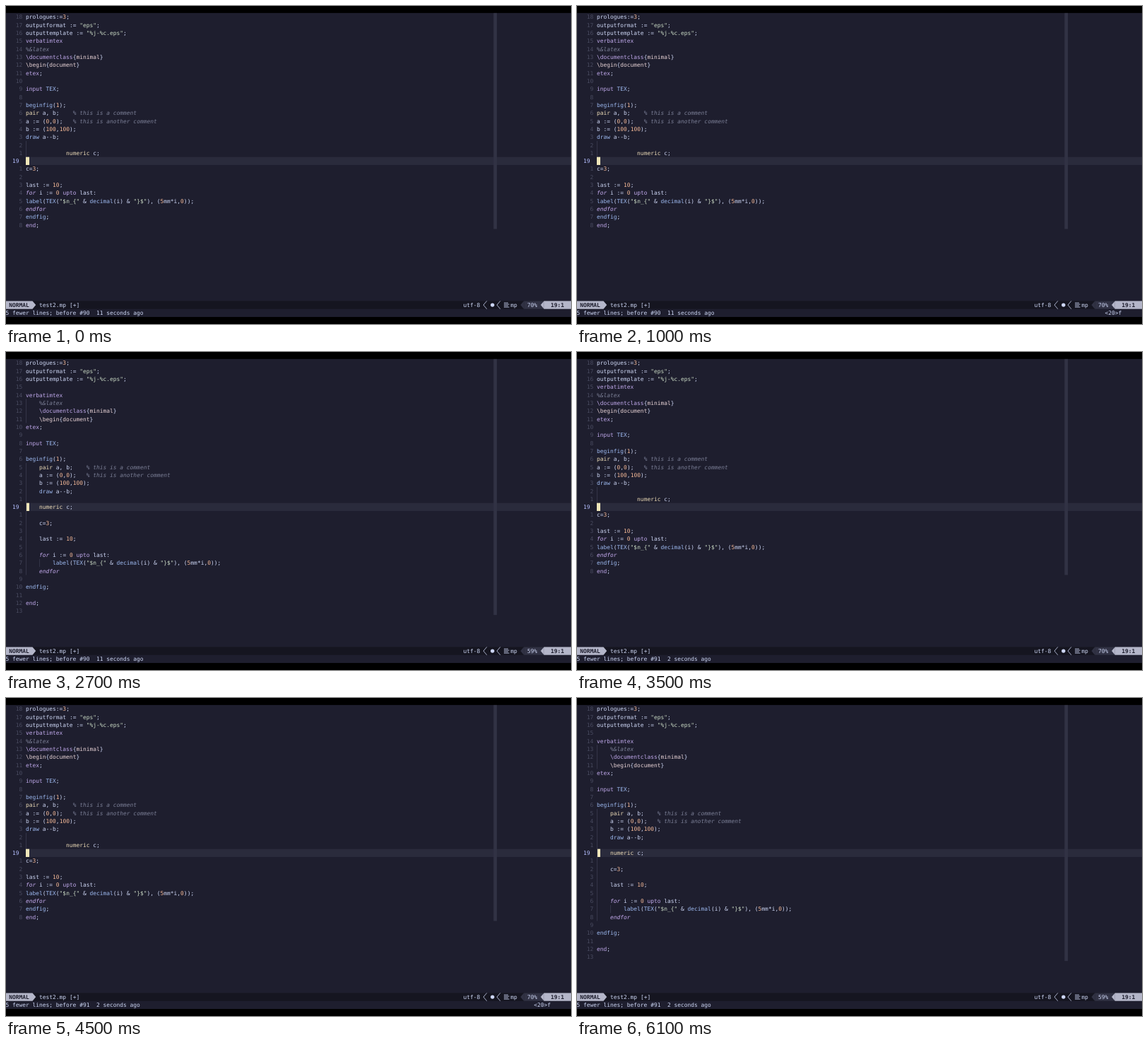
Write an HTML page that moves like this. It is 800 by 450 pixels and loops after 6.2 s.

```html
<!DOCTYPE html>
<html lang="en">
<head>
<meta charset="utf-8">
<title>Editor session</title>
<style>
  html, body { margin: 0; width: 100%; height: 100%; overflow: hidden; background: #000; }
  svg { display: block; width: 100vw; height: 100vh; }
  text { font: 7.915px "DejaVu Sans Mono", monospace; white-space: pre; fill: #cdd6f4; text-rendering: geometricPrecision; }
  .number { fill: #494b60; }
  .current { fill: #b4befe; }
  .comment { fill: #7b7f96; font-style: italic; }
  .string { fill: #c9d9c4; }
  .digit { fill: #f2b796; }
  .keyword { fill: #bfa8ea; }
  .loop { fill: #c5abef; font-style: italic; }
  .call { fill: #9db9f0; }
  .type { fill: #eddcb8; }
  .argument { fill: #e8d3d6; }
  .dark { fill: #1e1e2e; font-weight: bold; }
</style>
</head>
<body>
<svg id="stage" viewBox="0 0 800 450"></svg>
<script>
const LOOP = 6200, CELL = 4.765, ROW = 11.32, LEFT = -0.6, TOP = 9.9;
const CODE_COL = 6, CURSOR_ROW = 18, STATUS_ROW = 36;
const colX = col => LEFT + col * CELL;
const rowY = row => TOP + row * ROW;

const TIDY = `prologues:=3;
outputformat := "eps";
outputtemplate := "%j-%c.eps";

verbatimtex
    %&latex
    \\documentclass{minimal}
    \\begin{document}
etex;

input TEX;

beginfig(1);
    pair a, b;    % this is a comment
    a := (0,0);   % this is another comment
    b := (100,100);
    draw a--b;

    numeric c;

    c=3;

    last := 10;

    for i := 0 upto last:
        label(TEX("$n_{" & decimal(i) & "}$"), (5mm*i,0));
    endfor

endfig;

end;
`.split('\n');

// Unformatted version: no indents, fewer blank lines, one stray declaration.
const blankAfter = /^(etex;|input TEX;|draw a--b;|numeric c;|c=3;)$/;
const MESSY = TIDY.map(line => line.trim())
  .filter((line, i, all) => line || blankAfter.test(all[i - 1]))
  .map(line => line === 'numeric c;' ? ' '.repeat(12) + line : line);

const WORDS = {
  keyword: ['verbatimtex', 'etex', 'input', 'end', 'upto', '\\documentclass'],
  loop: ['for', 'endfor'],
  call: ['beginfig', 'endfig', 'draw', 'label', 'TEX', 'decimal'],
  type: ['pair', 'numeric'],
  argument: ['minimal', 'document', '\\begin']
};

function tokenClass(token) {
  if (token[0] === '"') return 'string';
  if (token[0] === '%') return 'comment';
  if (/^\d/.test(token)) return 'digit';
  return Object.keys(WORDS).find(name => WORDS[name].includes(token)) || '';
}

function add(parent, tag, attributes = {}, content = '') {
  const node = document.createElementNS('http://www.w3.org/2000/svg', tag);
  for (const [key, value] of Object.entries(attributes)) node.setAttribute(key, value);
  node.textContent = content;
  return parent.appendChild(node);
}
const rect = (parent, x, y, width, height, fill) => add(parent, 'rect', { x, y, width, height, fill });
const path = (parent, d, fill, stroke = 'none') => add(parent, 'path', { d, fill, stroke, 'stroke-width': 0.8 });
const write = (parent, col, row, content, name = '') =>
  add(parent, 'text', { x: colX(col), y: rowY(row) + 8.5, class: name }, content);

function drawCode(line, row, parent) {
  const text = write(parent, CODE_COL, row, '');
  const tokens = line.match(/"[^"]*"|%.*|\\?[a-zA-Z]+|\d+|\s+|./g) || [];
  for (const token of tokens) add(text, 'tspan', { class: tokenClass(token) }, token);
}

function drawGuide(parent, indent, first, last) {
  rect(parent, colX(CODE_COL + indent) + 0.2, rowY(first), 0.8, (last - first + 1) * ROW, '#3a3b4f');
}

function drawBuffer(lines, guides, percent, cursorX) {
  const group = add(stage, 'g');
  rect(group, colX(145), TOP, CELL, lines.length * ROW, '#313244');
  guides.forEach(guide => drawGuide(group, ...guide));
  lines.forEach((line, row) => {
    const distance = Math.abs(row - CURSOR_ROW);
    if (distance) write(group, 3, row, String(distance).padStart(2), 'number');
    else write(group, 2, row, '19', 'current');
    drawCode(line, row, group);
  });
  rect(group, cursorX, rowY(CURSOR_ROW), 33 - cursorX, ROW, '#efe6b9');
  write(group, 155, STATUS_ROW, percent);
  return group;
}

function drawStatusLine() {
  const y = rowY(STATUS_ROW), mid = y + ROW / 2, bottom = y + ROW;
  const light = '#b4b6c9', pale = '#cdd6f4';
  const arrowLeft = (col, fill) =>
    path(stage, `M${colX(col + 1)} ${y}L${colX(col)} ${mid}L${colX(col + 1)} ${bottom}Z`, fill);
  const chevron = col =>
    path(stage, `M${colX(col + 1)} ${y}L${colX(col)} ${mid}L${colX(col + 1)} ${bottom}`, 'none', pale);

  rect(stage, 0, y, 800, ROW, '#151520');
  path(stage, `M0 ${y}H${colX(8)}L${colX(9)} ${mid}L${colX(8)} ${bottom}H0Z`, light);
  write(stage, 1, STATUS_ROW, 'NORMAL', 'dark');
  write(stage, 10, STATUS_ROW, 'test2.mp [+]');
  write(stage, 136, STATUS_ROW, 'utf-8');
  chevron(142);
  add(stage, 'circle', { cx: 688.8, cy: mid, r: 2.7, fill: pale });
  chevron(146);
  [-3, -1, 1, 3].forEach((dy, i) => rect(stage, 705, mid + dy - 0.4, i % 2 ? 7.5 : 6, 0.8, pale));
  write(stage, 150, STATUS_ROW, 'mp');
  arrowLeft(153, '#313244');
  rect(stage, colX(154), y, colX(160) - colX(154), ROW, '#313244');
  arrowLeft(159, light);
  rect(stage, colX(160), y, 800 - colX(160), ROW, light);
  write(stage, 162, STATUS_ROW, '19:1', 'dark');
}

const stage = document.getElementById('stage');
rect(stage, 0, 0, 800, 450, '#000');
rect(stage, 0, TOP, 800, 38 * ROW, '#1e1e2e');
rect(stage, colX(CODE_COL), rowY(CURSOR_ROW), 800, ROW, '#2a2b3c');
drawStatusLine();
const messy = drawBuffer(MESSY, [[0, 16, 17]], '70%', 28);
const tidy = drawBuffer(TIDY, [[0, 5, 7], [0, 13, 26], [4, 25, 25]], '59%', 29);
const message = write(stage, 0, STATUS_ROW + 1, '');
const pendingKeys = write(stage, 157, STATUS_ROW + 1, '<20>f');

const show = (node, visible) => node.setAttribute('visibility', visible ? 'visible' : 'hidden');
const within = (t, from, to) => t >= from && t < to;

function render(now) {
  const t = now % LOOP;
  const formatted = within(t, 1200, 3000) || t >= 4700;
  show(tidy, formatted);
  show(messy, !formatted);
  show(pendingKeys, within(t, 900, 1200) || within(t, 4400, 4700));
  message.textContent = '5 fewer lines; before ' + (t < 3000 ? '#90  11' : '#91  2') + ' seconds ago';
  requestAnimationFrame(render);
}
render(performance.now());
</script>
</body>
</html>
```
